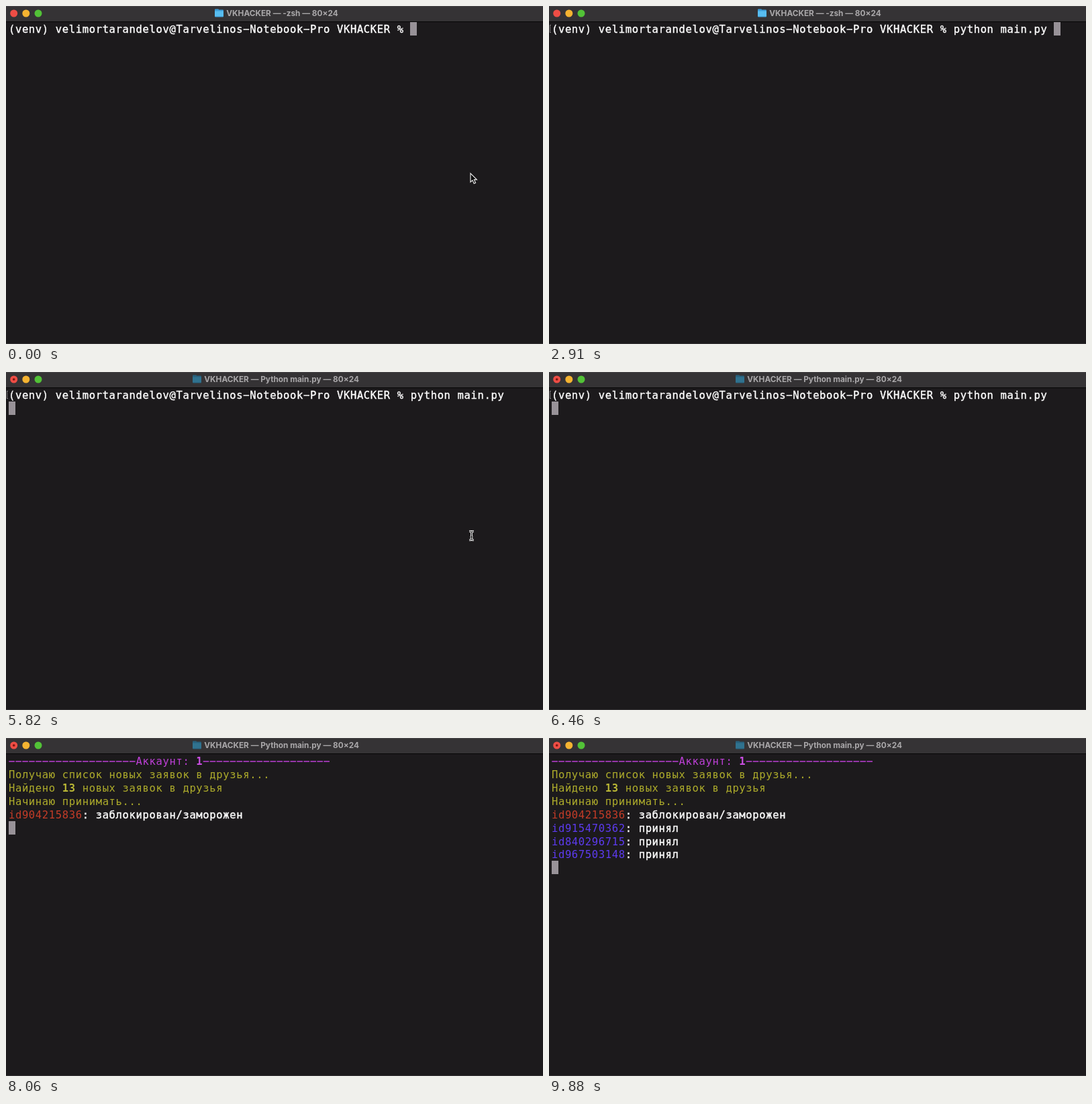
An HTML page with a canvas that plays this animation: 800 by 504 pixels, repeating every 9910 ms.

```html
<!DOCTYPE html>
<html lang="ru">
<head>
<meta charset="utf-8">
<title>Terminal</title>
<style>
  html, body { margin: 0; width: 100%; height: 100%; overflow: hidden; background: #1c1a1c; }
  canvas { display: block; }
</style>
</head>
<body>
<canvas id="stage" width="800" height="504"></canvas>
<script>
const ctx = document.getElementById('stage').getContext('2d');
const LOOP = 9910, CELL = 9.98, ROW = 19.92, LEFT = 3.6, TOP = 24;
const WHITE = '#fdfdfd', OLIVE = '#aeac2b', PINK = '#bd3fd6', RED = '#c43c28', BLUE = '#5d3bf0';
const DASHES = '-'.repeat(19);
const PROMPT = '(venv) velimortarandelov@Tarvelinos-Notebook-Pro VKHACKER % ';

// Input line: [time, text typed so far]
const TYPED = [
  [0, ''], [600, 'p'], [720, 'py'], [840, 'pyt'], [960, 'pyth'], [1080, 'pytho'],
  [1200, 'python'], [1380, 'python '], [2090, 'python m'], [2270, 'python ma'],
  [2510, 'python main.py ']
];
const HIDE_ARROW = 600, ENTER = 2900, NEWLINE = 2940, RUN = 3180, BEAM = 5820, CLEAR = 6500;

// Program output: [time, ...[colour, text, bold]]
const accepted = (time, id) => [time, [BLUE, id], [WHITE, ': принял']];
const OUTPUT = [
  [CLEAR, [PINK, DASHES + 'Аккаунт: '], ['#cc4fe4', '1', true], [PINK, DASHES]],
  [CLEAR, [OLIVE, 'Получаю список новых заявок в друзья...']],
  [7650, [OLIVE, 'Найдено '], ['#bab735', '13', true], [OLIVE, ' новых заявок в друзья']],
  [7650, [OLIVE, 'Начинаю принимать...']],
  [8000, [RED, 'id904215836'], [WHITE, ': заблокирован/заморожен']],
  accepted(8500, 'id915470362'),
  accepted(9300, 'id840296715'),
  accepted(9850, 'id967503148')
];

function rect(color, x, y, w, h) {
  ctx.fillStyle = color;
  ctx.fillRect(x, y, w, h);
}

function dot(color, x, y, r) {
  ctx.fillStyle = color;
  ctx.beginPath();
  ctx.arc(x, y, r, 0, 7);
  ctx.fill();
}

// Draws text on the character grid and returns the next column
function write(row, col, [color, text, bold]) {
  const y = TOP + row * ROW;
  ctx.font = `${bold ? 'bold ' : ''}15.5px "DejaVu Sans Mono", monospace`;
  ctx.textAlign = 'center';
  ctx.strokeStyle = color;
  ctx.lineWidth = 0.4;
  for (const ch of text) {
    const x = LEFT + col++ * CELL;
    if (ch === '-') {
      rect(color, x + 0.7, y + 10.2, 8.6, 1.5);
    } else if (ch !== ' ') {
      ctx.fillStyle = color;
      ctx.fillText(ch, x + CELL / 2, y + 16);
      if (color === WHITE) ctx.strokeText(ch, x + CELL / 2, y + 16);
    }
  }
  return col;
}

function cursor(row, col) {
  rect('#989298', Math.round(LEFT + col * CELL), Math.round(TOP + row * ROW), 10, 20);
}

function titleBar(running) {
  rect('#353335', 0, 0, 800, 23);
  rect('#474547', 0, 0, 800, 1);
  rect('#050505', 0, 23, 800, 1);
  dot('#ee4d45', 11.7, 11, 5.5);
  dot('#f5b331', 29.8, 11, 5.5);
  dot('#52c237', 48, 11, 5.5);
  if (running) dot('#7d1511', 11.7, 11, 1.8);

  const x = running ? 278 : 311;
  ctx.fillStyle = running ? '#27607c' : '#3a9bd6';
  ctx.beginPath();
  ctx.roundRect(x, 4.5, 6, 5, 1);
  ctx.roundRect(x, 5.5, 13, 11, 1.2);
  ctx.fill();
  rect(running ? '#30728f' : '#58bdf0', x, 7.5, 13, 8);

  ctx.font = '700 11.8px Inter, sans-serif';
  ctx.textAlign = 'left';
  ctx.fillStyle = '#aaa8aa';
  ctx.fillText(`VKHACKER — ${running ? 'Python main.py' : '-zsh'} — 80×24`, x + 17.3, 14.8);
}

function arrow(x, y) {
  const shape = new Path2D(`M${x} ${y}v13l3-2.7 2.2 5 2.4-1-2.2-4.9h4z`);
  ctx.fillStyle = '#0a0a0a';
  ctx.fill(shape);
  ctx.strokeStyle = '#f4f4f4';
  ctx.lineWidth = 1.1;
  ctx.stroke(shape);
}

function beam(x, y) {
  const shape = new Path2D(
    `M${x - 3.5} ${y - 6.5}h1.5q2 0 2 2v9q0 2-2 2h-1.5M${x + 3.5} ${y - 6.5}h-1.5q-2 0-2 2` +
    `v9q0 2 2 2h1.5M${x - 2} ${y + 2}h4`);
  for (const [color, width] of [['#f0f0f0', 3], ['#111', 1]]) {
    ctx.strokeStyle = color;
    ctx.lineWidth = width;
    ctx.stroke(shape);
  }
}

function shell(t) {
  const typed = TYPED.filter(([time]) => t >= time).pop()[1];
  const col = write(0, 0, [WHITE, PROMPT + typed]);
  if (t >= ENTER) {
    rect('#7c7a7c', 1, 28, 1, 12);
    rect('#7c7a7c', 1, 28, 2, 1);
    rect('#7c7a7c', 1, 39, 2, 1);
  }
  if (t < NEWLINE) cursor(0, col);
  else cursor(1, 0);
}

function output(t) {
  const lines = OUTPUT.filter(([time]) => t >= time);
  lines.forEach(([, ...parts], row) => parts.reduce((col, part) => write(row, col, part), 0));
  cursor(lines.length, 0);
}

function draw(t) {
  rect('#1c1a1c', 0, 0, 800, 504);
  rect('#353335', 0, 503, 800, 1);
  titleBar(t >= RUN);
  if (t < CLEAR) shell(t);
  else output(t);

  if (t < HIDE_ARROW) arrow(692, 249.5);
  if (t >= BEAM && t < CLEAR) {
    const p = Math.max(0, (t - BEAM - 60) / 300);
    beam(693.5 + 115 * p * p, 244);
  }
}

const start = performance.now();
function frame() {
  draw((performance.now() - start) % LOOP);
  requestAnimationFrame(frame);
}
frame();
</script>
</body>
</html>
```
